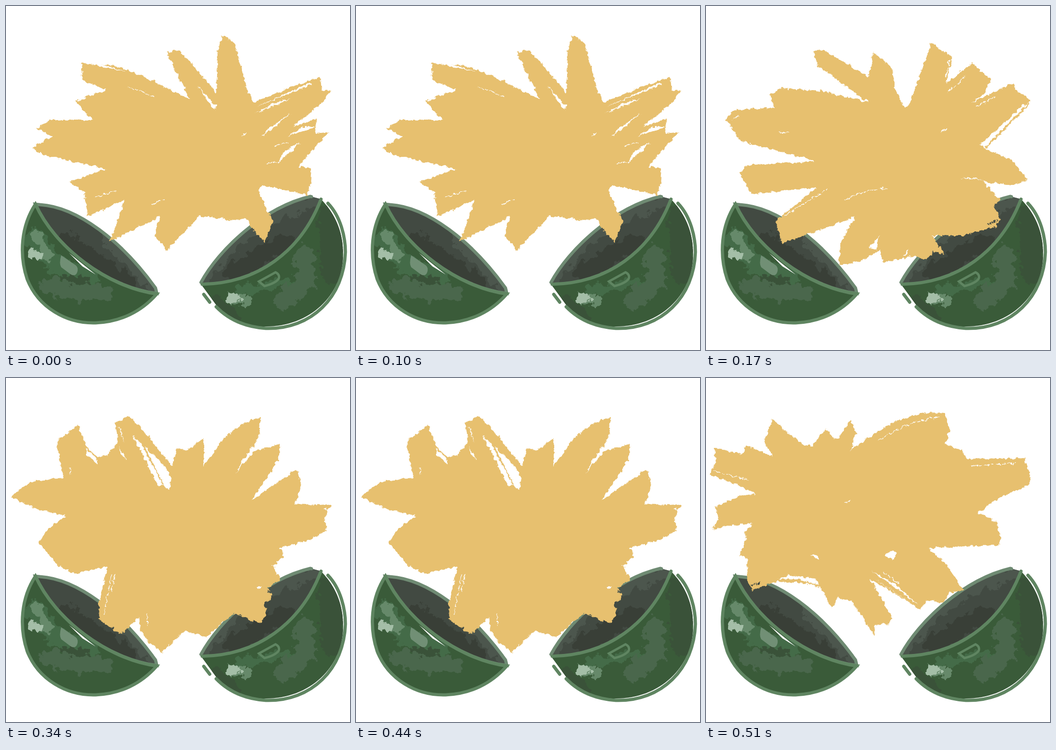
Recreate the animation shown at these times as an HTML page. Size 748 by 748 pixels, loop 680 ms.

```html
<!DOCTYPE html>
<html lang="en">
<head>
<meta charset="utf-8">
<title>Burst from an open bowl</title>
<style>
html, body { margin: 0; width: 100%; height: 100%; overflow: hidden; background: #fff; }
svg { display: block; width: 100%; height: 100%; fill: none; }
.burst { fill: #e7c06f; filter: url(#rough); visibility: hidden; animation: flip 680ms step-end infinite; }
.b2 { animation-delay: -510ms; }
.b3 { animation-delay: -340ms; }
.b4 { animation-delay: -170ms; }
@keyframes flip {
  0% { visibility: visible; }
  25%, 100% { visibility: hidden; }
}
.gap { fill: #fff; }
.scratch { fill: none; stroke: #fff; stroke-width: 1.7; stroke-dasharray: 14 2 7 3; }
.streak { fill: none; stroke: #e7c06f; stroke-width: 4; }
.speck { fill: none; stroke: #434b43; stroke-width: 5; stroke-dasharray: 3 2; }
.line { stroke: #5f8561; stroke-width: 7; stroke-linecap: round; }
.thin { stroke-width: 5; }
.back { stroke: #6f8b73; }
.skin { fill: #3a5b39; }
.cup { fill: #424a42; }
.dab { filter: url(#paint); stroke-linecap: round; }
.dark { stroke: #393f37; }
.pale { stroke: #4c564d; }
.deep { stroke: #3a5239; }
.mid { stroke: #4a674c; }
.moss { stroke: #446b48; }
.lit { stroke: #66896a; }
.shine { stroke: #a4bea7; }
</style>
</head>
<body>
<svg viewBox="0 0 748 748">
  <defs>
    <filter id="rough" filterUnits="userSpaceOnUse" width="748" height="748" x="0" y="0" color-interpolation-filters="sRGB">
      <feTurbulence type="fractalNoise" baseFrequency=".11" numOctaves="4" seed="4"/>
      <feDisplacementMap in="SourceGraphic" scale="10" xChannelSelector="R" yChannelSelector="G"/>
    </filter>
    <filter id="paint" filterUnits="userSpaceOnUse" width="748" height="748" x="0" y="0" color-interpolation-filters="sRGB">
      <feTurbulence type="fractalNoise" baseFrequency=".06" numOctaves="4" seed="9"/>
      <feDisplacementMap in="SourceGraphic" scale="34" xChannelSelector="R" yChannelSelector="G"/>
    </filter>
    <path id="bodyL" d="M64 431C33 478 28 540 46 594C70 655 131 691 195 689C248 687 294 665 328 626C220 612 106 524 64 431Z"/>
    <path id="bodyR" pathLength="100" d="M685 420C641 535 545 604 424 605L457 650C486 684 522 697 565 697C660 697 733 630 733 540C733 505 725 462 685 420Z"/>
    <path id="cupL" d="M325 613C252 511 155 437 74 432L64 431C106 524 220 612 328 625Z"/>
    <path id="cupR" pathLength="100" d="M424 601C462 530 560 438 662 414L685 420C641 535 545 604 424 605Z"/>
    <clipPath id="skinL"><use href="#bodyL"/></clipPath>
    <clipPath id="skinR"><use href="#bodyR"/></clipPath>
    <clipPath id="holeL"><use href="#cupL"/></clipPath>
    <clipPath id="holeR"><use href="#cupR"/></clipPath>
  </defs>

  <use href="#cupL" class="cup"/>
  <g clip-path="url(#holeL)">
    <g class="dab">
      <path class="pale" stroke-width="30" d="M225 505L325 612"/>
      <path class="dark" stroke-width="36" d="M130 510L265 605"/>
    </g>
  </g>
  <use href="#cupL" class="line back"/>
  <use href="#bodyL" class="skin"/>
  <g clip-path="url(#skinL)">
    <g class="dab">
      <path class="moss" stroke-width="42" d="M62 505L110 565 180 590"/>
      <path class="deep" stroke-width="16" d="M130 592L175 597"/>
      <path class="mid" stroke-width="38" d="M92 608L160 624 215 622"/>
      <path class="lit" stroke-width="24" d="M68 502L88 542"/>
      <path class="shine" stroke-width="18" d="M55 536L68 543"/>
    </g>
  </g>
  <path d="M120 542L152 564Q159 570 154 581 149 589 140 583L120 568Q115 560 120 542Z" fill="#718f75"/>
  <path class="gap" d="M137 537L195 584 166 566Z"/>
  <use href="#bodyL" class="line"/>

  <use href="#cupR" class="cup"/>
  <g clip-path="url(#holeR)">
    <g class="dab">
      <path class="pale" stroke-width="26" d="M430 590Q540 450 680 425"/>
      <path class="dark" stroke-width="40" d="M495 580L605 515"/>
    </g>
  </g>
  <use href="#cupR" class="line back" stroke-dasharray="46 100"/>
  <use href="#bodyR" class="skin"/>
  <g clip-path="url(#skinR)">
    <g class="dab">
      <path class="deep" stroke-width="50" d="M705 460L710 580"/>
      <path class="deep" stroke-width="26" d="M455 640L500 680"/>
      <path class="moss" stroke-width="20" d="M510 620L610 600"/>
      <path class="mid" stroke-width="40" d="M650 540L650 600 605 640"/>
      <path class="lit" stroke-width="22" d="M492 636L526 641"/>
      <path class="shine" stroke-width="14" d="M486 636L502 632"/>
    </g>
  </g>
  <path class="line thin" d="M550 599L586 579Q596 584 593 593 586 603 562 609Z"/>
  <use href="#bodyR" class="line" stroke-dasharray="37.3 100"/>
  <path class="line" d="M700 429C728 458 738 503 738 535C735 632 665 704 565 701C522 698 486 684 457 654M430 627L443 644"/>

  <g class="burst">
    <path d="M400 203L349 101 373 95 400 120 457 189 459 105 470 65 496 79 525 186 538 210 620 176 682 155 686 182 706 184 690 208 625 262 675 246 672 277 700 276 635 348 663 353 664 385 655 411 562 391 547 398 580 470 562 513 538 488 522 460 505 467 420 456 350 532 323 499 335 458 224 513 236 486 258 422 176 458 171 406 137 383 217 354 80 324 56 308 100 284 68 267 95 248 189 248 148 205 218 183 165 161 164 122 240 130 310 158Z"/>
    <path class="gap" d="M172 124L188 120 262 143ZM416 173L457 217 453 226ZM544 219L663 166 664 171ZM541 234L620 202 580 212ZM554 286L575 263 622 232ZM610 284L645 263 673 263ZM604 316L640 297 590 343ZM512 282L524 273 522 281ZM154 206L172 193 173 202Z"/>
    <path class="scratch" d="M265 175L320 196M316 432L342 421M195 416L240 402M583 306L614 296M566 342L590 337"/>
  </g>

  <g class="burst b2">
    <path d="M432 220L441 218 472 130 490 80 514 97 535 112 523 168 578 124 620 160 604 192 575 212 668 167 673 182 706 207 690 216 593 304 665 335 700 379 662 389 555 374 600 380 641 422 625 432 640 462 630 480 560 499 492 499 518 540 495 533 480 552 455 543 430 549 384 558 378 530 337 555 288 563 294 512 325 457 240 490 165 516 151 468 242 394 100 409 73 365 90 346 237 337 75 294 44 247 60 227 147 221 139 193 165 179 250 184 352 209 243 130 232 97 255 95 353 154 364 100 404 135 413 185Z"/>
    <path class="gap" d="M355 526L377 500 370 531ZM429 545L441 527 439 538ZM554 374L575 373 602 378Z"/>
    <path class="scratch" d="M302 422Q345 398 395 397M172 456L265 397M158 273L180 276M512 273L526 266M526 187L565 152M588 218L632 196M522 155L530 115M58 245L72 239M606 190L615 168"/>
    <path class="streak" d="M608 308L703 211"/>
    <path class="speck" d="M612 475L632 467"/>
  </g>

  <g class="burst b3">
    <path d="M430 192L470 135 510 102 553 83 550 128 499 206 538 161 598 142 592 178 534 266 632 198 643 236 627 274 706 277 690 304 698 330 660 352 597 370 604 388 580 407 596 437 570 457 578 480 560 487 568 515 550 534 495 511 435 564 388 549 338 596 308 572 291 545 290 518 250 557 203 527 201 490 221 410 150 426 112 406 70 357 96 322 130 300 60 283 10 258 55 225 123 217 110 138 156 102 175 150 198 172 220 169 244 136 237 97 270 83 310 128 362 192 371 153 394 157 430 130Z"/>
    <path class="gap" d="M301 148L340 187 358 215 357 242 344 235ZM275 123L297 150 342 235 330 232ZM174 153L198 178 198 186 178 168ZM243 103L251 118 257 140ZM247 150L261 176 250 167ZM546 455L557 453 549 460ZM690 284L697 282 697 288Z"/>
    <path class="scratch" d="M230 425L213 512M238 426L230 462M306 512L308 540M139 195L141 210M274 86L330 140"/>
  </g>

  <g class="burst b4">
    <path d="M315 156L380 112 420 91 460 79 490 74 518 77 530 115 520 144 557 157 568 178 692 174 706 215 703 232 635 262 592 292 630 312 642 348 638 363 484 369 525 408 560 462 528 467 515 489 480 483 465 503 358 437 404 521 398 535 366 537 368 562 316 484 286 479 274 500 248 455 220 446 150 443 100 463 89 435 90 390 72 388 88 350 84 335 101 315 15 328 27 308 20 280 75 256 109 252 70 233 8 210 22 180 17 152 80 165 87 147 145 171 127 138 144 89 185 125 215 146 230 146 262 110 277 130 287 131 314 91 327 120Z"/>
    <path class="gap" d="M155 438L180 428 237 436 247 450 195 437ZM224 386L241 383 245 393ZM388 385L400 377 414 380 408 396ZM360 419L412 449 462 493ZM366 436L400 458 450 493Z"/>
    <path class="scratch" d="M383 420L421 448M375 135Q450 88 510 86M577 191L675 185M302 272L317 267M18 203L95 222"/>
    <path class="speck" d="M100 451L118 444"/>
  </g>
</svg>
</body>
</html>
```
